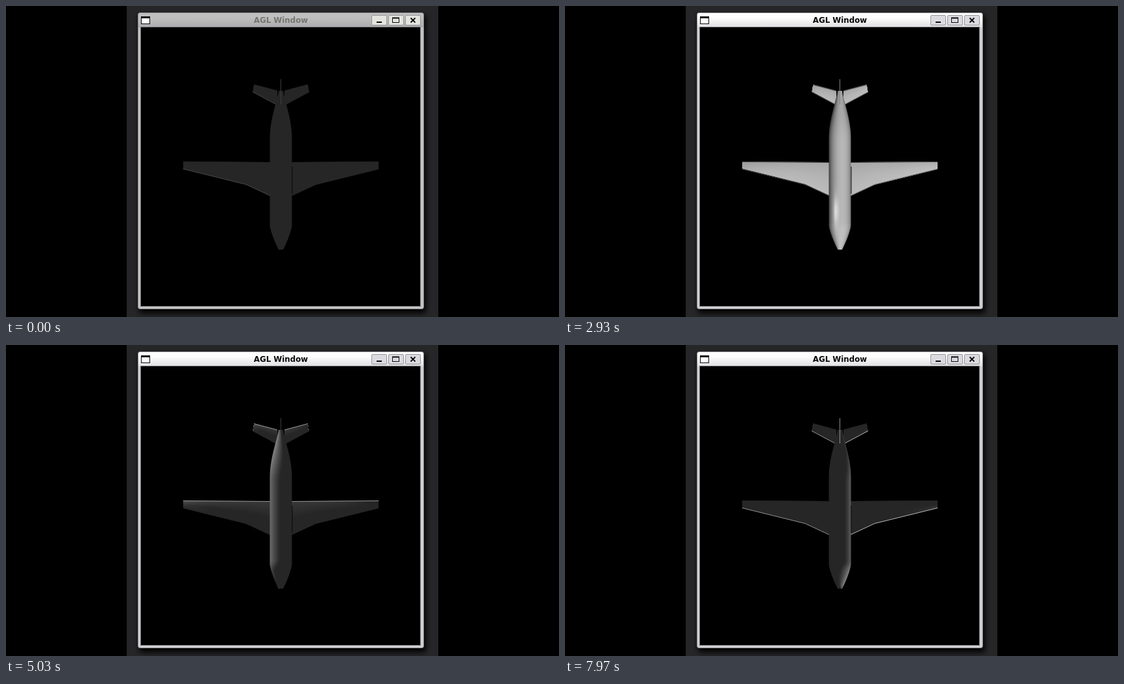
An HTML page with a canvas that plays this animation: 852 px wide and 480 px high, repeating every 8000 ms.

```html
<!DOCTYPE html>
<html lang="en">
<head>
<meta charset="utf-8">
<title>AGL Window</title>
<style>
html, body { margin: 0; width: 100%; height: 100%; overflow: hidden; background: #000; }
svg, canvas { position: absolute; left: 0; top: 0; width: 852px; height: 480px; display: block; }
#win { --bar: #fdfdfd; --frame: #cfcfd4; --ink: #0a0a0a; --btn: #dadae0; }
#win.idle { --bar: #bfbfbf; --frame: #c3c3c3; --ink: #757570; --btn: #e4e4de; }
#win text { font: bold 11.8px "DejaVu Sans", sans-serif; fill: var(--ink); }
</style>
</head>
<body>
<svg viewBox="0 0 852 480">
  <defs>
    <filter id="soft" x="-10%" y="-10%" width="120%" height="120%"><feGaussianBlur stdDeviation="4"/></filter>
    <linearGradient id="gloss" x2="0" y2="1">
      <stop offset=".3" stop-color="#445" stop-opacity="0"/>
      <stop offset="1" stop-color="#445" stop-opacity=".16"/>
    </linearGradient>
  </defs>
  <rect width="852" height="480"/>
  <rect x="186" width="480" height="480" fill="#262628"/>
  <rect x="205" y="14" width="442" height="460" rx="4" fill="#060606" filter="url(#soft)"/>
  <g id="win">
    <rect x="203.5" y="10.5" width="440" height="457" rx="3" fill="var(--frame)" stroke="#8c8c90"/>
    <path id="bar" d="M204 33V14Q204 11 207 11H640Q643 11 643 14V33Z" fill="var(--bar)"/>
    <use href="#bar" style="--bar: url(#gloss)"/>
    <rect x="207.5" y="32.5" width="431" height="431" fill="#000" stroke="#747478"/>
    <rect x="208.5" y="16.5" width="13" height="11" fill="#fff" stroke="#0a0a0a"/>
    <path d="M208 17.5H222" stroke="#0a0a0a" stroke-width="3"/>
    <text x="423.5" y="26" text-anchor="middle">AGL Window</text>
    <g fill="var(--btn)" stroke="#96969a">
      <rect x="563.5" y="14.5" width="23" height="15" rx="1.5"/>
      <rect x="589.5" y="14.5" width="23" height="15" rx="1.5"/>
      <rect x="615.5" y="14.5" width="23" height="15" rx="1.5"/>
    </g>
    <g fill="none" stroke="#0a0a0a">
      <path d="M571 25H579" stroke-width="2"/>
      <rect x="595.5" y="18.5" width="10" height="7"/>
      <path d="M595 18.5H606" stroke-width="2"/>
      <path d="M623.5 18.5L630.5 25.5M630.5 18.5L623.5 25.5" stroke-width="1.8"/>
    </g>
  </g>
</svg>
<canvas id="view" width="852" height="480"></canvas>
<script>
const LOOP = 8000, ORBIT = 6500, NOON = 3350, FOCUS = 100;
const CX = 423.5, TAIL = 131, NOSE = 376;
const win = document.getElementById('win');
const ctx = document.getElementById('view').getContext('2d');
const clamp = (v, lo, hi) => Math.min(hi, Math.max(lo, v));

let angle, light;

function color(level) {
  const v = Math.round(clamp(38 + 155 * level, 0, 255));
  return `rgb(${v},${v},${v})`;
}

function lit(x, y, z) {
  const dot = x * light[0] + y * light[1] + z * light[2];
  return Math.max(0, dot) / Math.hypot(x, y, z);
}

// Half width of the fuselage: a tapered tail, a tube and a rounded nose
function hullWidth(y) {
  const tail = clamp((y - TAIL) / 74, 0, 1);
  const nose = clamp((y - 338) / 38, 0, 1);
  return 3.5 + 13.5 * (Math.sin(tail * Math.PI / 2) ** 1.2 - nose ** 1.4);
}

const wing = {
  from: 16.5, to: 150.5,
  top: x => 241 - (x - 17) / 133,
  bottom: x => Math.max(252 + (150.5 - x) * 0.247, 276 + (53.5 - x) * 0.466)
};
const fin = {
  from: 5.5, to: 43.5,
  top: x => Math.max(131 - (x - 4) * 0.267, 121 + (x - 41.5) * 6),
  bottom: x => 152 - (x - 8) * 0.535
};

// One column at a time; the surface rounds off towards its edges and tip
function drawPanel(side, { from, to, top, bottom }) {
  const front = color(lit(side * 0.3, 0.9, side < 0 ? -0.25 : 0.1));
  const back = color(lit(0, -0.85, 0.5));
  for (let x = from; x < to; x++) {
    const left = side < 0 ? CX - x - 1 : CX + x;
    const y0 = top(x + 0.5), y1 = bottom(x + 0.5);
    const bend = side * 0.35 * ((x - from) / (to - from)) ** 3;
    const g = ctx.createLinearGradient(0, y0, 0, y1);
    g.addColorStop(0, color(lit(bend, -0.2, 1)));
    g.addColorStop(0.5, color(lit(bend, 0, 1)));
    g.addColorStop(1, color(lit(bend, 0.25, 1)));
    ctx.fillStyle = g;
    ctx.fillRect(left, y0, 1, y1 - y0);
    ctx.fillStyle = back;
    ctx.fillRect(left, y0, 1, 1);
    ctx.fillStyle = front;
    ctx.fillRect(left, y1 - 1, 1, 1);
  }
}

// One row at a time, with a highlight that travels from nose to tail
function drawHull() {
  const rad = angle * Math.PI / 180;
  const gx = -Math.sin(rad + Math.PI / 4), gy = 290 - 1.15 * angle;
  const shine = 0.45 * Math.sqrt(Math.max(0, Math.cos(rad)));
  for (let y = TAIL; y < NOSE; y++) {
    const w = hullWidth(y + 0.5);
    const slope = (hullWidth(y - 5) - hullWidth(y + 6)) / 11;
    const g = ctx.createLinearGradient(CX - w, 0, CX + w, 0);
    for (let i = 0; i <= 10; i++) {
      const u = i / 5 - 1;
      const spot = Math.exp(-(((u - gx) / 0.2) ** 2) - ((y - gy) / 22) ** 2);
      g.addColorStop(i / 10, color(lit(u, slope, Math.sqrt(1.15 - u * u)) + shine * spot));
    }
    ctx.fillStyle = g;
    ctx.fillRect(CX - w, y, 2 * w, 1);
  }
}

function draw(t) {
  angle = ((t - NOON) / ORBIT * 360 + 540) % 360 - 180;
  const rad = angle * Math.PI / 180;
  light = [-0.5 * Math.sin(rad), -0.86 * Math.sin(rad), Math.cos(rad)];
  win.classList.toggle('idle', t < FOCUS);

  ctx.clearRect(0, 0, 852, 480);
  for (const side of [-1, 1]) {
    drawPanel(side, wing);
    drawPanel(side, fin);
  }
  drawHull();

  // Wing root gap and upright fin
  ctx.fillStyle = '#080808';
  ctx.fillRect(440.5, 248, 1, 42);
  ctx.fillStyle = color(0.15 + lit(0.9, 0.1, 0.2));
  ctx.fillRect(423, 113, 1, 39);
}

function tick(now) {
  draw(now % LOOP);
  requestAnimationFrame(tick);
}
requestAnimationFrame(tick);
</script>
</body>
</html>
```
